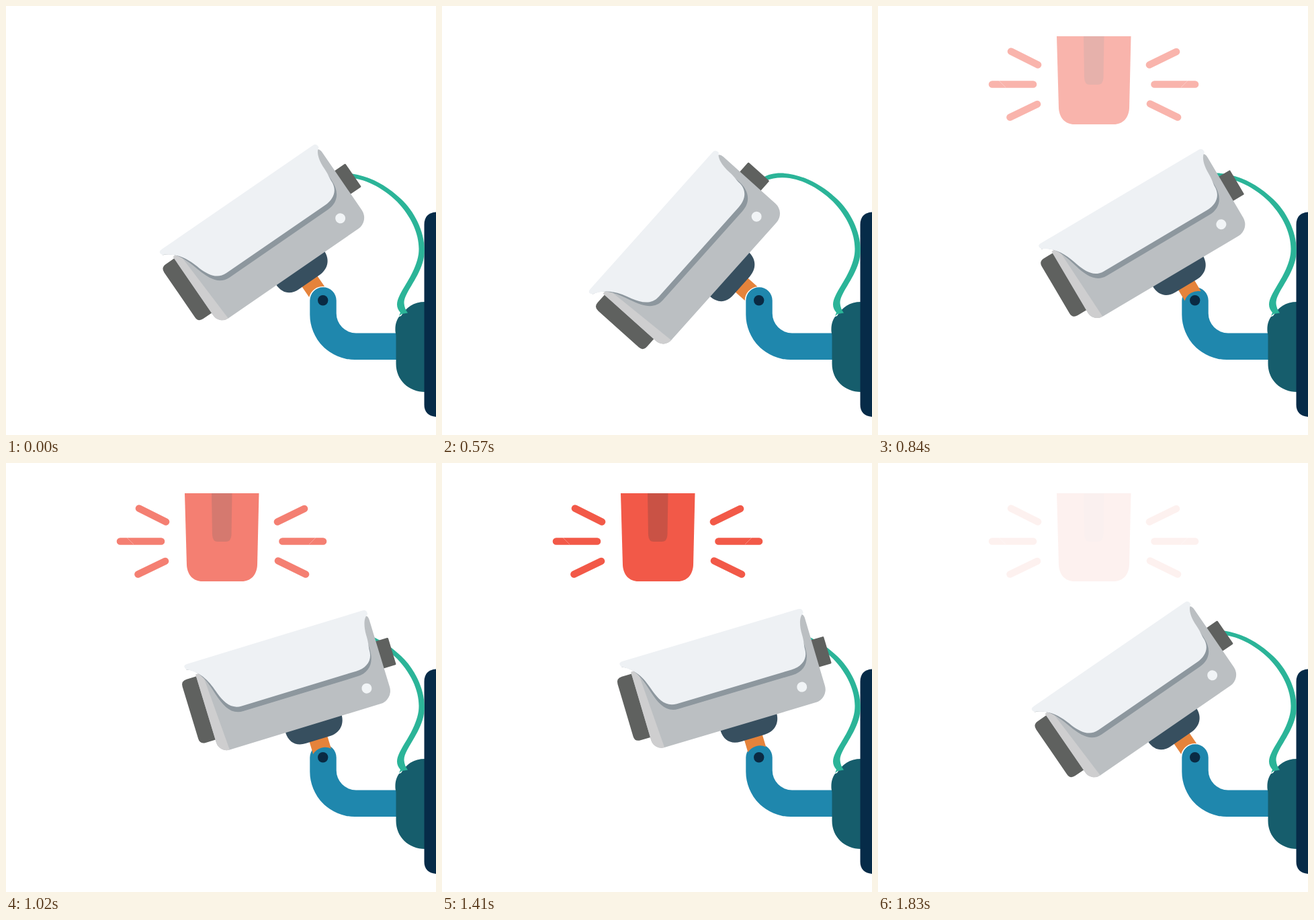
An HTML page that plays this animation: 640 by 638 pixels, repeating every 1930 ms.

```html
<!DOCTYPE html>
<html lang="en">
<head>
<meta charset="utf-8">
<title>Security camera</title>
<style>
html, body { margin: 0; width: 100%; height: 100%; overflow: hidden; background: #fff; }
svg { display: block; width: 100%; height: 100%; }
</style>
</head>
<body>
<svg viewBox="0 0 640 638">
  <g id="alarm" opacity="0">
    <path fill="#f25948" d="M266 45H376.5L374 152C373 167 364 176 351 176H292C279 176 270 167 269 152Z"/>
    <path fill="#c95245" d="M306 45H336.5L335.5 107Q335 117 327 117H315Q307.5 117 307 107Z"/>
    <path fill="none" stroke="#f25948" stroke-width="10.6" stroke-linecap="round"
      d="M198 67.5L238 87.5M170 116.5H231M196.5 165.5L237 146M404 87.5L444 68M411.5 116.5H472M405 145.5L446 165.5"/>
    <path fill="none" stroke="#fff" stroke-opacity=".3" d="M180 111L190 121M461 111L451 121"/>
  </g>

  <path fill="#1f87ad" d="M452.3 438a19.7 19.7 0 0 1 39.4 0V457A29.5 29.5 0 0 0 521 486.5H582V526H519A67 67 0 0 1 452.3 459Z"/>
  <circle cx="471.7" cy="437.8" r="7.7" fill="#0a2a43"/>
  <path fill="#165d6c" d="M624 440C606 440 596 448 588 461L585 462C581 468 579 474 579.5 484L580.5 490V532C580.5 556 599 574 624 574Z"/>
  <path fill="#062b48" d="M640 306.500Q622.500 308 622.500 325V593Q622.500 609 640 611Z"/>
  <path fill="#2bb498" d="M478 255C500 241 548 249 588 287C612 309 630 350 620 382C612 408 592 428 592.5 442Q593 450 598 456.5L589 458L585 461L587 456C580 448 581 440 586 430C594 414 610 394 614 369C617 345 606 316 582 291C552 262 513 247 481 260Z"/>

  <!-- camera, drawn level with the joint at 0,0 -->
  <g id="camera">
    <path fill="#e5833b" d="M-14-36H14V-15.700A21 21 0 0 0-14-15.700Z"/>
    <path fill="#374f5f" d="M-44-59C-44-42-34-34-20-34H17C32-34 43-43 43.500-59Z"/>
    <path fill="#5f615f" d="M-145-177H-162Q-171-177-171-168V-87Q-171-78.500-162-78.500H-145Z"/>
    <rect x="122" y="-149" width="21" height="42" rx="1.5" fill="#5f615f"/>
    <path fill="#bbbfc2" d="M-147-178L119-190Q124-190 124-182V-78A20 20 0 0 1 104-58H-131A16 16 0 0 1-147-74Z"/>
    <path fill="#cececf" d="M-147-180H-137L-131-58A16 16 0 0 1-147-74Z"/>
    <path fill="#8d979e" d="M-159-191C-140-185-133-165-127-143C-121-122-113-107-95-107H82C102-107 112-120 112-140V-150Z"/>
    <path fill="#eef1f4" d="M-154-198.600H118Q125-198.600 124-191C119-189 113-180 113-160C113-150 111-143 111-139C111-124 100-115 83-115H-95C-112-115-119-129-124-143C-130-163-137-180-158-191Q-163-198.600-154-198.600Z"/>
    <circle cx="90.7" cy="-86" r="7.5" fill="#f1f4f6"/>
  </g>
</svg>
<script>
const LOOP = 1930, STEP = 30, LAST = 1830;
const joint = [471.6, 438], mid = [-16, -123];
// tilt in degrees at each key time
const keys = [[0, 34.5], [600, 48.9], [1170, 5.5], [1800, 34.5]];
const camera = document.getElementById('camera');
const alarm = document.getElementById('alarm');

const clamp = v => Math.max(0, Math.min(1, v));
const lerp = (a, b, u) => a + (b - a) * u;

function centre(tilt) {
  const r = tilt * Math.PI / 180, c = Math.cos(r), s = Math.sin(r);
  return [joint[0] + c * mid[0] + s * mid[1], joint[1] - s * mid[0] + c * mid[1]];
}

function draw(t) {
  const i = t < keys[1][0] ? 0 : t < keys[2][0] ? 1 : 2;
  const [t0, a0] = keys[i], [t1, a1] = keys[i + 1];
  const u = clamp((t - t0) / (t1 - t0));
  // the centre moves on a straight line while the tilt changes
  const p = centre(a0), q = centre(a1);
  const x = lerp(p[0], q[0], u), y = lerp(p[1], q[1], u);
  camera.setAttribute('transform',
    `translate(${x} ${y}) rotate(${-lerp(a0, a1, u)}) translate(${-mid[0]} ${-mid[1]})`);
  alarm.setAttribute('opacity', Math.min(clamp((t - 590) / 560), clamp((1860 - t) / 390)));
}

const start = performance.now();
function tick() {
  const t = (performance.now() - start) % LOOP;
  draw(Math.min(LAST, Math.floor(t / STEP) * STEP));
  requestAnimationFrame(tick);
}
tick();
</script>
</body>
</html>
```
